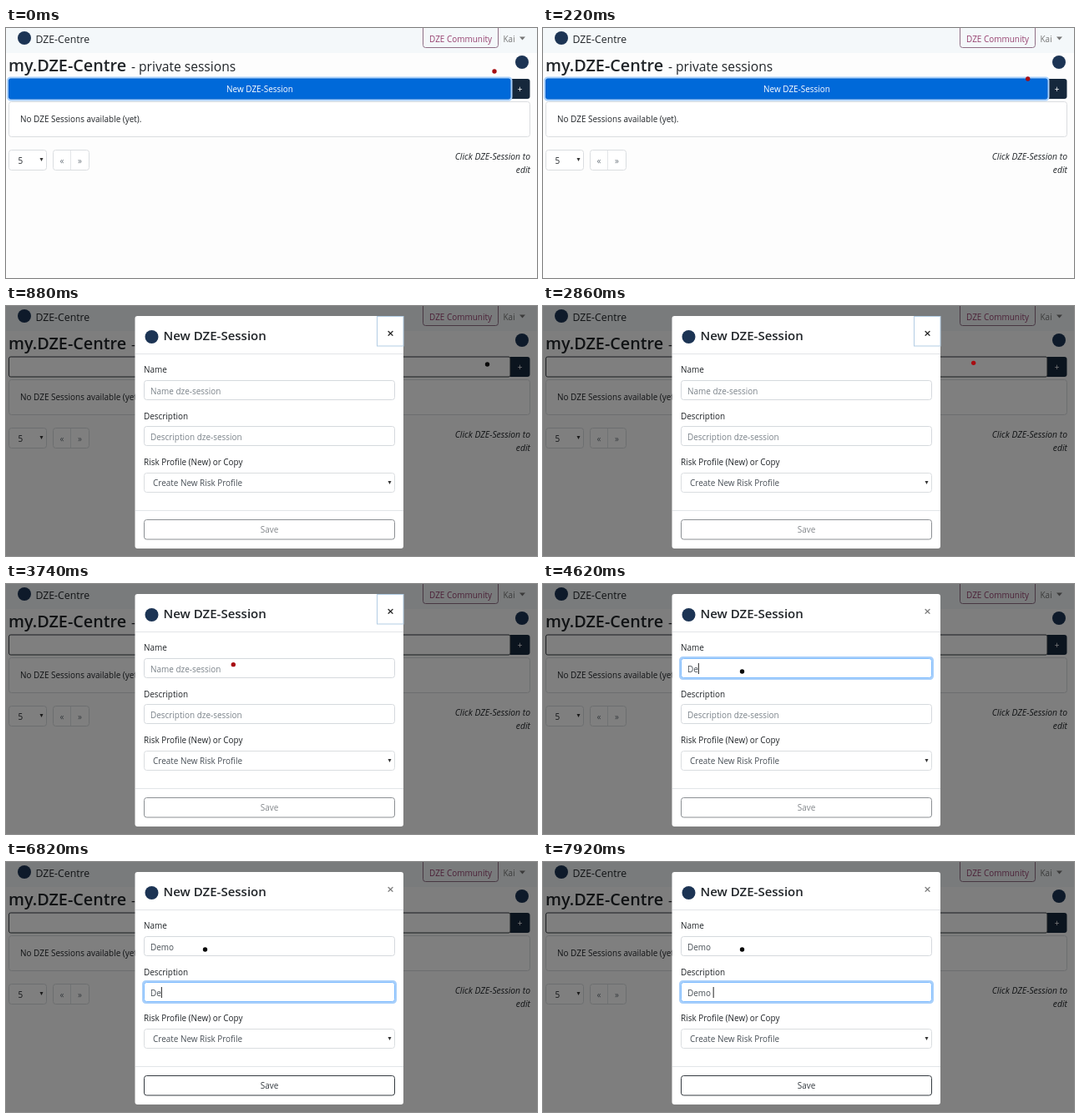
These frames come from a looping animation (636x300 px, 8 s). An HTML page:

```html
<!DOCTYPE html>
<html lang="en">
<head>
<meta charset="utf-8">
<title>New session</title>
<style>
  html, body { margin: 0; width: 100%; height: 100%; overflow: hidden; background: #fdfdfd; }
  svg { display: block; width: 636px; height: 300px; }
  text { font: 9.95px "Open Sans", "Noto Sans", sans-serif; fill: #212529; white-space: pre; }
  .mid { text-anchor: middle; }
  .end { text-anchor: end; font-style: italic; font-size: 10.4px; }
  .muted { fill: #6c757d; }
  .logo { fill: #1c3454; }
  .box { fill: #fff; stroke: #dadde0; }
  .rule { stroke: #e2e5e8; }
  .glow { fill: none; stroke: #a9d0fb; stroke-width: 3; }
  #community rect { fill: none; stroke: #8f6f86; }
  #community text { fill: #96406f; }
</style>
</head>
<body>
<svg viewBox="0 0 636 300">
  <rect width="636" height="300" fill="#fdfdfd"/>
  <rect width="636" height="30" fill="#f4f8fa"/>
  <circle class="logo" cx="22" cy="12" r="8"/>
  <text x="35.5" y="17.5" style="font-size:12.25px">DZE-Centre</text>
  <g id="community">
    <rect x="499.5" y="-3.5" width="90" height="27" rx="3"/>
    <text class="mid" x="544.5" y="16.5">DZE Community</text>
  </g>
  <text x="595.5" y="16.5" style="fill:#777">Kai</text>
  <path d="M615 10.5h7l-3.5 4z" fill="#777"/>

  <text x="3" y="52" style="font-size:19.8px;font-weight:600">my.DZE-Centre</text>
  <text x="150" y="52" style="font-size:15.6px">- private sessions</text>
  <circle class="logo" cx="618" cy="41" r="8"/>

  <path d="M604 61h20.5q3 0 3 3v18q0 3-3 3h-20.5z" fill="#16283c"/>
  <text class="mid" x="615.5" y="77" style="fill:#fff">+</text>
  <rect id="newGlow" class="glow" x="2.5" y="60" width="602.5" height="26" rx="3"/>
  <rect id="newBtn" x="3.5" y="61" width="600.5" height="24" rx="2"/>
  <text id="newText" class="mid" x="304" y="77">New DZE-Session</text>

  <rect class="box" x="3.5" y="88.5" width="624" height="42" rx="3"/>
  <text x="17" y="113">No DZE Sessions available (yet).</text>
  <rect class="box" x="3.5" y="146.5" width="45" height="24" rx="3"/>
  <text x="14.5" y="163">5</text>
  <path d="M40.5 156h4l-2 4z" fill="#333"/>
  <rect class="box" x="56.5" y="146.5" width="43" height="24" rx="3"/>
  <path class="rule" d="M77.5 147v23"/>
  <text class="mid muted" x="67" y="162.5">«</text>
  <text class="mid muted" x="88.5" y="162.5">»</text>
  <text class="end" x="628" y="158">Click DZE-Session to</text>
  <text class="end" x="628" y="173.5">edit</text>

  <g id="modal">
    <rect width="636" height="300" opacity=".5"/>
    <rect x="154.5" y="12" width="321.5" height="279" rx="3" fill="#fff"/>
    <circle class="logo" cx="174.5" cy="37" r="8"/>
    <text x="188.5" y="41" style="font-size:15px;font-weight:600">New DZE-Session</text>
    <rect id="closeBox" x="444.5" y="12.5" width="31.5" height="35.5" fill="#fff" stroke="#b3cde4"/>
    <text id="close" class="mid" x="460.5" y="37.5" style="font-size:15px;font-weight:600">×</text>
    <path class="rule" d="M155 57.5h321M155 245.5h321"/>
    <text x="165" y="80">Name</text>
    <text x="165" y="135.5">Description</text>
    <text x="165" y="191">Risk Profile (New) or Copy</text>
    <g id="name" transform="translate(165 89)"></g>
    <g id="desc" transform="translate(165 144)"></g>
    <rect class="box" x="165.5" y="200.5" width="300" height="23" rx="3"/>
    <text x="176" y="216" style="fill:#495057">Create New Risk Profile</text>
    <path d="M457.5 210h4l-2 4z" fill="#333"/>
    <rect id="saveBox" x="165.5" y="256.5" width="300" height="23.5" rx="3" fill="#fff"/>
    <text id="save" class="mid" x="315.5" y="272">Save</text>
  </g>
  <circle id="dot" r="2.7"/>
</svg>
<script>
const $ = id => document.getElementById(id);
const STEP = 220, LOOP = 8000;
const nameKeys = [4400, 4620, 5500, 5720];
const descKeys = [6380, 6820, 7040, 7260, 7480];

const show = (el, on) => el.setAttribute('visibility', on ? 'inherit' : 'hidden');
const paint = (id, fill, stroke) => {
  $(id).style.fill = fill;
  if (stroke) $(id).style.stroke = stroke;
};
const typed = (text, keys, t) => text.slice(0, keys.filter(k => t >= k).length);

function makeField(id, hint) {
  $(id).innerHTML = `<rect class="glow" x="-.5" y="-.5" width="302" height="25" rx="3"/>
    <rect class="box" x=".5" y=".5" width="300" height="23" rx="3"/>
    <text x="8" y="16.5"></text><path d="M0 6v13" stroke="#222"/>`;
  const [glow, box, text, caret] = $(id).children;
  return (value, focus) => {
    show(glow, focus);
    show(caret, focus);
    box.style.stroke = focus ? '#80bdff' : '#d5d9dd';
    text.textContent = value || hint;
    text.style.fill = value ? '#495057' : '#7b838a';
    const width = value ? text.getComputedTextLength() : 0;
    caret.setAttribute('transform', `translate(${8.5 + width} 0)`);
  };
}
const setName = makeField('name', 'Name dze-session');
const setDesc = makeField('desc', 'Description dze-session');

function pointer(t) {
  if (t < 440) {
    const p = t / 440;
    return [585 - 8.5 * p, 52 + 18 * p, true];
  }
  const p = Math.min(1, 0.18 * Math.max(0, (t - 2640) / STEP));
  return [576.5 - 338 * p, 70 - 19 * p + 54 * p * p, p > 0 && p < 1];
}

function draw(now) {
  const t = Math.floor(now % LOOP / STEP) * STEP;
  const pressed = t < 440, open = t >= 880;
  const closeFocus = t < 3960, inDesc = t >= 6160;

  show($('modal'), open);
  show($('newGlow'), !open);
  paint('newBtn', pressed ? '#0069d9' : '#fff', pressed ? '#0062cc' : open ? '#343a40' : '#6466bd');
  paint('newText', pressed ? '#fff' : '#8f4078');

  show($('closeBox'), closeFocus);
  paint('close', closeFocus ? '#222' : '#7c7c7c');
  const desc = typed('Demo ', descKeys, t);
  setName(typed('Demo', nameKeys, t), !closeFocus && !inDesc);
  setDesc(desc, inDesc);
  paint('saveBox', '#fff', desc ? '#343a40' : '#8b8f93');
  paint('save', desc ? '#343a40' : '#83878b');

  const [x, y, moving] = pointer(t);
  $('dot').setAttribute('transform', `translate(${x} ${y})`);
  paint('dot', moving ? '#a80d12' : '#0a0a0a');
}

const start = performance.now();
function loop() {
  draw(performance.now() - start);
  requestAnimationFrame(loop);
}
loop();
</script>
</body>
</html>
```
